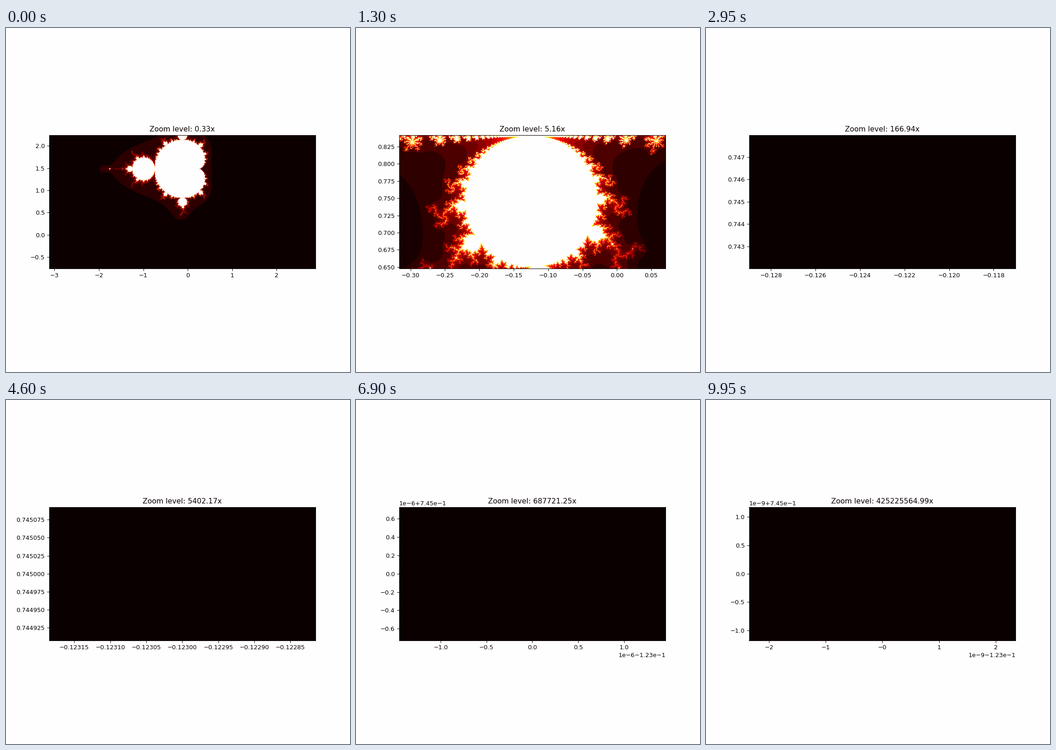
Animation, 748 px wide and 748 px high, one loop 10 s. Source, as a matplotlib script:

```python
import numpy as np
import matplotlib as mpl
import matplotlib.pyplot as plt
from matplotlib.animation import FuncAnimation

INCHES, DPI = 8, 93.5
FRAMES, INTERVAL = 200, 50
WIDTH, HEIGHT = 580, 290
CENTER_X, CENTER_Y = -0.123, 0.745
START_HEIGHT, SHRINK = 3.0, 0.9
MAX_ITER = 100
BULB_CENTER, BULB_RADIUS = -0.12256 + 0.74486j, 0.088
INK, PAPER = "#0a0000", "#fefefe"

HOT = mpl.colormaps["hot"]

mpl.rcParams.update({
    "font.family": "DejaVu Sans",
    "text.color": INK,
    "axes.edgecolor": INK,
    "xtick.color": INK,
    "ytick.color": INK,
})


def surely_inside(c):
    """Points in the cardioid, the period-2 disc or the period-3 bulb."""
    x, y = c.real, np.abs(c.imag)
    q = (x - 0.25) ** 2 + y ** 2
    cardioid = q * (q + x - 0.25) <= y ** 2 / 4
    disc = (x + 1) ** 2 + y ** 2 <= 1 / 16
    bulb = np.abs(x + 1j * y - BULB_CENTER) <= BULB_RADIUS
    return cardioid | disc | bulb


def escape_counts(x0, x1, y0, y1):
    xs = np.linspace(x0, x1, WIDTH)
    ys = np.linspace(y0, y1, HEIGHT)
    grid = (xs + 1j * ys[:, None]).ravel()
    counts = np.full(grid.size, MAX_ITER)
    active = np.flatnonzero(~surely_inside(grid))
    c = grid[active]
    z = np.zeros_like(c)
    for n in range(1, MAX_ITER):
        z = z * z + c
        out = z.real ** 2 + z.imag ** 2 > 4
        if out.any():
            counts[active[out]] = n
            keep = ~out
            active, c, z = active[keep], c[keep], z[keep]
    return counts.reshape(HEIGHT, WIDTH)


def flatten_shades(rgb):
    """Merge close shades into bands of their mean colour."""
    r, g, b = (rgb[..., k].ravel().astype(int) for k in range(3))
    key = (r >> 5) << 7 | (g >> 4) << 3 | b >> 5
    total = np.maximum(np.bincount(key), 1)
    bands = [(np.bincount(key, ch) / total)[key] for ch in (r, g, b)]
    flat = np.stack(bands, axis=-1).reshape(rgb.shape)
    return np.minimum(flat, 254).astype(np.uint8)


def render(x0, x1, y0, y1):
    # A view wholly within the bulb has a single value.
    if np.hypot(x1 - x0, y1 - y0) / 2 < BULB_RADIUS:
        counts = np.zeros((HEIGHT, WIDTH))
    else:
        counts = escape_counts(x0, x1, y0, y1)
    low, high = counts.min(), counts.max()
    share = (counts - low) / max(high - low, 1)
    return flatten_shades(HOT(share, bytes=True)[..., :3])


fig, ax = plt.subplots(figsize=(INCHES, INCHES), dpi=DPI, facecolor=PAPER)
ax.set_box_aspect(HEIGHT / WIDTH)
image = ax.imshow(np.zeros((HEIGHT, WIDTH, 3), np.uint8),
                  extent=(0, 1, 0, 1), transform=ax.transAxes,
                  aspect="auto", interpolation="nearest")


def update(frame):
    height = START_HEIGHT * SHRINK ** frame
    x0, x1 = CENTER_X - height, CENTER_X + height
    y0, y1 = CENTER_Y - height / 2, CENTER_Y + height / 2
    image.set_data(render(x0, x1, y0, y1))
    ax.set_xlim(x0, x1)
    ax.set_ylim(y0, y1)
    ax.set_title(f"Zoom level: {1 / height:.2f}x")
    return [image]


anim = FuncAnimation(fig, update, frames=FRAMES, interval=INTERVAL,
                     repeat=True, repeat_delay=0, blit=False)
plt.show()
```
